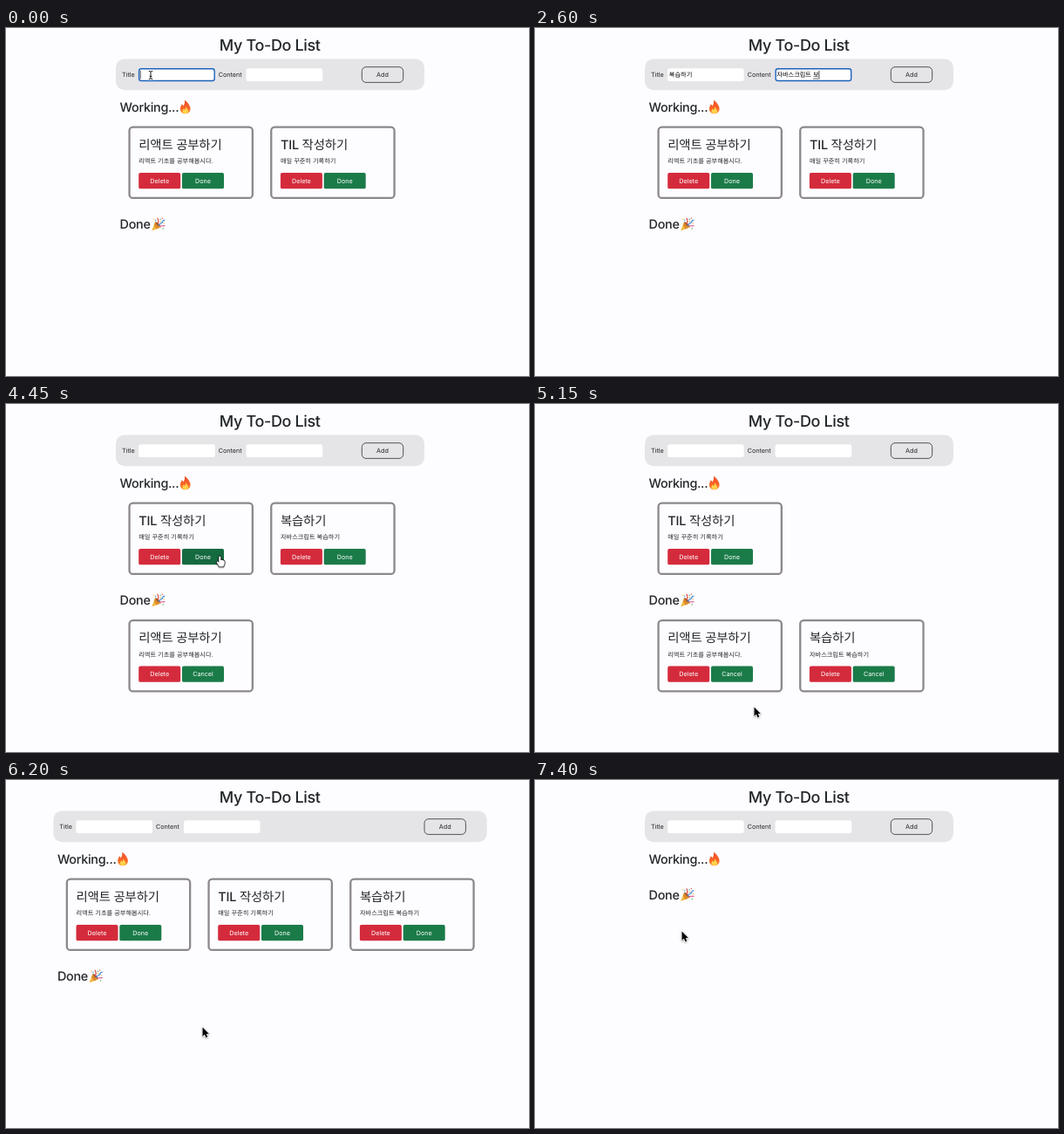
Write an HTML page with a canvas that moves like this. It is 600 by 399 pixels and loops after 7450 ms.

```html
<!DOCTYPE html>
<html lang="ko">
<head>
<meta charset="utf-8">
<title>My To-Do List</title>
<style>
  html, body { margin: 0; width: 100%; height: 100%; overflow: hidden; background: #fdfcfe; }
  canvas { display: block; width: 600px; height: 399px; }
</style>
</head>
<body>
<canvas id="stage"></canvas>
<script>
const W = 600, H = 399, LOOP = 7450, STEP = 50;
const FONT = 'Inter, "Noto Sans CJK KR", "Noto Sans CJK", sans-serif';
const INK = '#212529';
const canvas = document.getElementById('stage');
const ctx = canvas.getContext('2d');
const ratio = window.devicePixelRatio || 1;
canvas.width = W * ratio;
canvas.height = H * ratio;

const cards = [
  { title: '리액트 공부하기', note: '리액트 기초를 공부해봅시다.' },
  { title: 'TIL 작성하기', note: '매일 꾸준히 기록하기' },
  { title: '복습하기', note: '자바스크립트 복습하기' }
];

// [time, card, new place]; an empty place means deleted
const moves = [
  [3100, 2, 'work'], [4250, 0, 'done'], [4750, 2, 'done'], [5650, 0, 'work'],
  [6100, 2, 'work'], [6600, 0, ''], [6950, 1, ''], [7250, 2, '']
];
const SUBMIT = 3100, TAB = 1350, BLUR = 4250;

// [time, x, y] of the pointer's hot spot
const track = [
  [0, 166, 54], [3250, 166, 54], [3850, 164, 155], [3900, 164, 156], [4150, 154, 175],
  [4300, 154, 175], [4650, 386, 175], [4800, 386, 175], [5150, 251.5, 347.5],
  [5300, 251.5, 347], [5550, 227, 310], [6100, 226, 309], [6200, 225.5, 283.5],
  [6500, 106, 175], [6630, 106, 175], [6880, 174, 175], [7250, 174, 175],
  [7400, 168.5, 173.5]
];

// Hangul input: every key press yields the text as the input method shows it
const LEADS = 'ㄱㄲㄴㄷㄸㄹㅁㅂㅃㅅㅆㅇㅈㅉㅊㅋㅌㅍㅎ';
const TAILS = ' ㄱㄲㄳㄴㄵㄶㄷㄹㄺㄻㄼㄽㄾㄿㅀㅁㅂㅄㅅㅆㅇㅈㅊㅋㅌㅍㅎ';

function keyStates(text) {
  const states = [];
  let before = '', prev = 0;
  const push = (s, composing = true) => states.push({ text: s, composing });
  for (const ch of text) {
    const code = ch.charCodeAt(0);
    if (ch === ' ') {
      push(before + ch, false);
      prev = 0;
    } else {
      const index = code - 0xac00, tail = index % 28;
      const lead = LEADS[Math.floor(index / 588)];
      const prevTail = prev ? (prev - 0xac00) % 28 : -1;
      let borrowed = 0;
      if (prevTail === 0) borrowed = TAILS.indexOf(lead);
      if (TAILS[prevTail] === 'ㄱ' && lead === 'ㅅ') borrowed = 2;
      push(borrowed > 0 ? before.slice(0, -1) + String.fromCharCode(prev + borrowed) : before + lead);
      push(before + String.fromCharCode(code - tail));
      if (tail) push(before + ch);
      prev = code;
    }
    before += ch;
  }
  return states;
}

const titleKeys = keyStates(cards[2].title);
const noteKeys = keyStates(cards[2].note);
const titleKeyTime = k => 350 + k * 77;
const noteKeyTime = k => k < 16 ? 1600 + k * 63 : 2615 + (k - 16) * 47;

function typed(keys, keyTime, t) {
  const count = keys.filter((_, k) => t >= keyTime(k)).length;
  return count ? keys[count - 1] : { text: '', composing: false };
}

let pointer, pointerKind;

function over(x, y, w, h) {
  return pointer.x >= x && pointer.x <= x + w && pointer.y >= y && pointer.y <= y + h;
}

function text(str, x, y, size, { weight = 400, color = INK, align = 'left', track = 0 } = {}) {
  ctx.font = `${weight} ${size}px ${FONT}`;
  ctx.letterSpacing = `${track * size}px`;
  ctx.textAlign = align;
  ctx.fillStyle = color;
  ctx.fillText(str, x, y);
  return ctx.measureText(str).width;
}

function box(x, y, w, h, r, fill, stroke, line) {
  ctx.beginPath();
  ctx.roundRect(x, y, w, h, r);
  if (fill) {
    ctx.fillStyle = fill;
    ctx.fill();
  }
  if (stroke) {
    ctx.strokeStyle = stroke;
    ctx.lineWidth = line;
    ctx.stroke();
  }
}

function shape(d, fill) {
  ctx.fillStyle = fill;
  ctx.fill(new Path2D(d));
}

function curl(d, color, width) {
  ctx.strokeStyle = color;
  ctx.lineWidth = width;
  ctx.stroke(new Path2D(d));
}

function at(x, y, draw) {
  ctx.save();
  ctx.translate(x, y);
  draw();
  ctx.restore();
}

function fire() {
  const glow = ctx.createLinearGradient(0, 0, 0, 16);
  glow.addColorStop(0, '#ee4a23');
  glow.addColorStop(0.55, '#f8642a');
  glow.addColorStop(1, '#fc9a30');
  shape('M7 .3C9.4 1.6 12.6 5 13.6 8.6C14.6 12.6 12 15.8 8 15.8C4 15.8 1.4 12.8 2.2 9C2.6 7.4 3.6 6.4 3.9 4.8C4.9 5.4 5.3 6.2 5.4 7C7 5.4 7.8 3 7 .3Z', glow);
  shape('M8.3 7.2C8.6 9.4 11.5 10.6 11.2 13C11 14.9 9.5 15.6 8 15.6C6.3 15.6 4.7 14.5 4.8 12.7C4.9 11.5 5.7 11 6 10C6.8 10.6 7.1 11 7.2 11.4C8 10.4 8.5 9 8.3 7.2Z', '#ffd24a');
}

function popper() {
  shape('M.6 15.6L4.6 5.2Q8.6 7 11.2 11.6Z', '#f3b53c');
  shape('M3.2 8.9L4.6 5.2L9 12.3L6.2 13.4Z', '#dd8a2b');
  shape('M4.6 5.2Q8.2 5 11.2 11.6Q6.6 10.4 4.6 5.2Z', '#8d5a35');
  ctx.lineCap = 'round';
  curl('M7 7.6C8.8 6 8.6 3.6 7.3 1.2', '#e2504f', 1.3);
  curl('M9 9C10.6 6.2 12.6 7.2 13.2 5C13.5 3.8 14.3 3.2 15.3 3.4', '#4a8fdc', 1.3);
  curl('M10 10.3C11.8 9 13.4 10.4 15.4 9.6', '#d95c9b', 1.2);
  const dots = [[3.2, 2.2, '#e8b83a'], [10.6, 2.3, '#57a85a'], [5.1, 3.5, '#4a8fdc'],
    [12.7, 1.2, '#e2504f'], [14.6, 6.8, '#eab63a'], [13.6, 13, '#57a85a'], [11, 5, '#e8b83a']];
  for (const [x, y, color] of dots) box(x - 0.65, y - 0.65, 1.3, 1.3, 0.4, color);
}

function heading(str, x, y, emoji, gap) {
  text(str, x, y, 14.4, { weight: 500, track: -0.02 });
  at(x + gap, y - 13.3, emoji);
}

function input(x, value, focused, caret) {
  box(x, 46.3, 87.6, 14.7, 2.6, '#fff');
  if (focused) box(x + 0.5, 46.8, 86.6, 13.7, 2.6, null, '#1c62bd', 1.4);
  if (over(x, 46, 88, 15)) pointerKind = 'beam';
  const left = x + 1.7;
  const width = text(value.text, left, 56.4, 7.2, { color: '#000' });
  if (!focused) return;
  ctx.fillStyle = '#111';
  if (value.composing) ctx.fillRect(left + width - 6.6, 57.7, 6.4, 0.6);
  if (caret) ctx.fillRect(left + width, 49, 0.7, 9.5);
}

function button(label, x, y, color, dark) {
  const hot = over(x, y, 48, 18.3);
  if (hot) pointerKind = 'hand';
  box(x, y, 48, 18.3, 1.9, hot ? dark : color);
  text(label, x + 24, y + 11.8, 7.2, { color: '#fff', align: 'center' });
}

function line(str, x, y, size, style) {
  const width = text(str, x, y, size, style);
  if (over(x, y - size, width, size * 1.3)) pointerKind = 'beam';
}

function card({ title, note }, x, y, action) {
  box(x + 1.15, y + 1.15, 141.3, 81.4, 4, null, '#8c888d', 2.3);
  line(title, x + 11.8, y + 26.2, 14.4, { weight: 500, track: -0.01 });
  line(note, x + 11.8, y + 43, 7.2);
  button('Delete', x + 11.8, y + 53.6, '#d42b3c', '#b82836');
  button(action, x + 61.6, y + 53.6, '#1a7b49', '#156a40');
}

function form(left, right, t) {
  box(left, 35.4, right - left, 35.8, 10, '#e5e4e6');
  const sent = t >= SUBMIT, empty = { text: '', composing: false };
  const focus = t < TAB ? 'title' : t < BLUR ? 'note' : '';
  const caret = t < 1200 || t >= TAB;
  text('Title', left + 7, 56.4, 7.2);
  input(left + 26.1, sent ? empty : typed(titleKeys, titleKeyTime, t), focus === 'title', caret);
  text('Content', left + 117.7, 56.4, 7.2);
  input(left + 149.6, sent ? empty : typed(noteKeys, noteKeyTime, t), focus === 'note', caret);
  box(right - 71.7, 44.7, 47.4, 17.7, 4.8, null, INK, 0.75);
  text('Add', right - 48, 56.4, 7.2, { align: 'center' });
}

function pointerAt(t) {
  let i = track.findIndex(p => p[0] > t);
  if (i < 0) i = track.length;
  const a = track[i - 1], b = track[i] || a;
  const u = b === a ? 0 : (t - a[0]) / (b[0] - a[0]);
  const e = u * u * (3 - 2 * u);
  return { x: a[1] + (b[1] - a[1]) * e, y: a[2] + (b[2] - a[2]) * e };
}

const beam = new Path2D('M-2.2-4.6Q0-4.6 0-3.4V3.4Q0 4.6-2.2 4.6M2.2-4.6Q0-4.6 0-3.4M0 3.4Q0 4.6 2.2 4.6M-1.4 1.4H1.4');
const arrow = new Path2D('M0 0V10.4L2.4 8.3L4 11.9L5.8 11.1L4.3 7.7L7.4 7.5Z');
const hand = new Path2D('M-1 .6Q-1-.6 0-.6Q1-.6 1 .6V4Q2 3.4 2.7 4.2Q3.7 3.8 4.2 4.6Q5.4 4.4 5.4 5.8V8Q5.2 9.6 4.3 10.5V11.5H-.8Q-1.5 9.8-3 7.8Q-4.4 6-3.2 5.6Q-2.2 5.4-1 7Z');

function outline(path, color, width) {
  ctx.strokeStyle = color;
  ctx.lineWidth = width;
  ctx.stroke(path);
}

function drawPointer() {
  ctx.lineJoin = 'round';
  if (pointerKind === 'beam') {
    outline(beam, '#fff', 2);
    outline(beam, '#111', 0.95);
    return;
  }
  ctx.shadowColor = 'rgba(0,0,0,.35)';
  ctx.shadowBlur = 2 * ratio;
  ctx.shadowOffsetY = 0.8 * ratio;
  const isHand = pointerKind === 'hand';
  const path = isHand ? hand : arrow;
  outline(path, isHand ? '#111' : '#fff', 1.4);
  ctx.shadowColor = 'transparent';
  ctx.fillStyle = isHand ? '#fff' : '#000';
  ctx.fill(path);
}

function draw(t) {
  const places = ['work', 'work', ''];
  for (const [time, id, place] of moves) if (t >= time) places[id] = place;
  const work = cards.filter((_, i) => places[i] === 'work');
  const done = cards.filter((_, i) => places[i] === 'done');
  const half = work.length > 2 ? 248.7 : 177;
  const left = 303 - half, right = 303 + half;

  pointer = pointerAt(t);
  pointerKind = 'arrow';
  ctx.setTransform(ratio, 0, 0, ratio, 0, 0);
  ctx.textRendering = 'geometricPrecision';
  ctx.fillStyle = '#fdfcfe';
  ctx.fillRect(0, 0, W, H);

  text('My To-Do List', 302.7, 25.8, 18, { weight: 500, align: 'center', track: -0.02 });
  form(left, right, t);
  heading('Working...', left + 4.6, 95.8, fire, 67.2);
  heading('Done', left + 4.6, work.length ? 230.3 : 136.8, popper, 36);
  const row = (list, y, action) =>
    list.forEach((item, i) => card(item, left + 14.4 + i * 162.7, y, action));
  row(work, 112.4, 'Done');
  row(done, 246.9, 'Cancel');

  const hidden = t >= 350 && t < 3250;
  if (!hidden) at(pointer.x, pointer.y, drawPointer);
}

const start = performance.now();
function tick() {
  const t = (performance.now() - start) % LOOP;
  draw(Math.floor(t / STEP) * STEP);
  requestAnimationFrame(tick);
}
tick();
</script>
</body>
</html>
```
